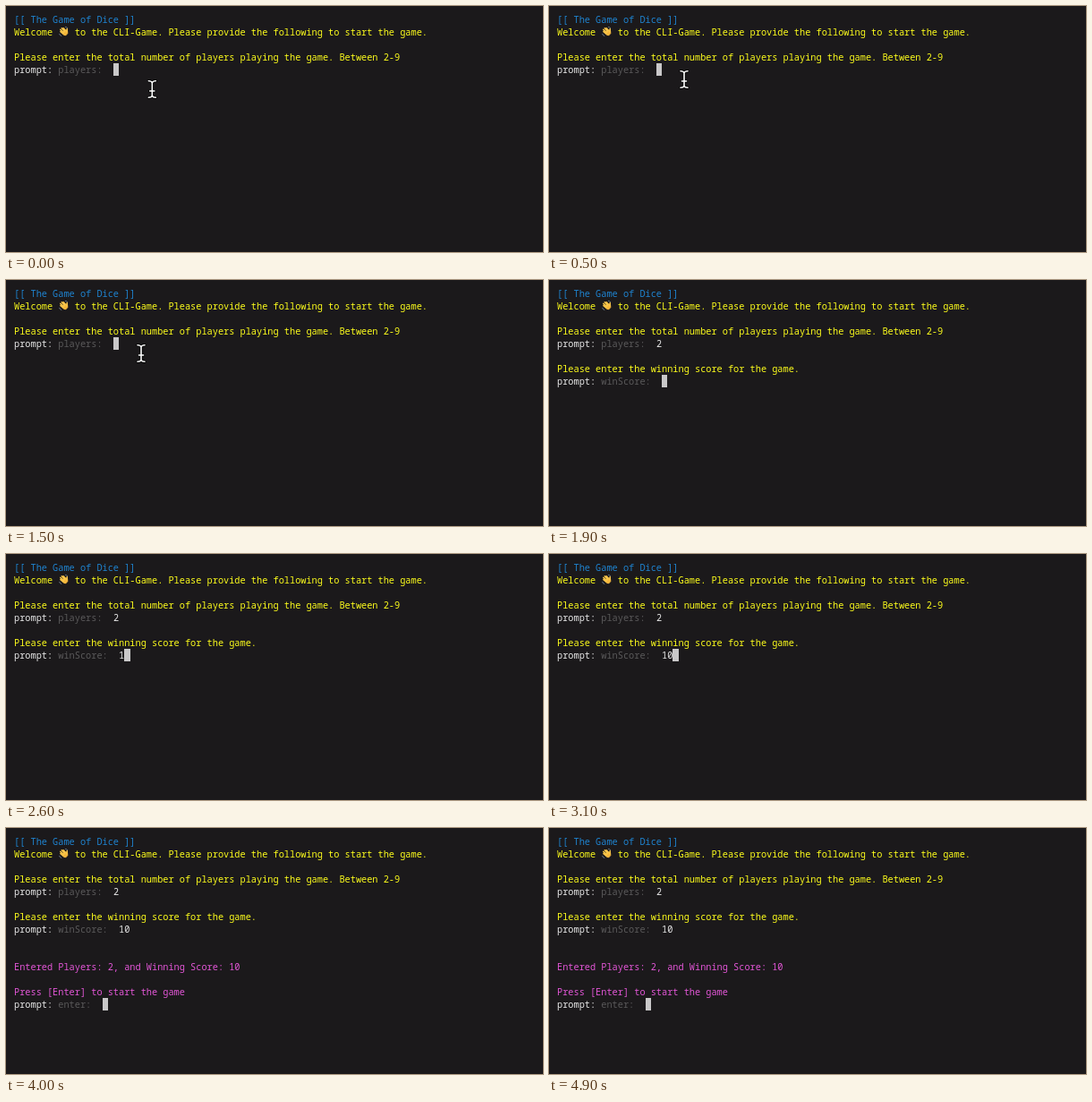
These frames come from a looping animation (600 px wide and 275 px high, 5 s). An HTML page:

```html
<!DOCTYPE html>
<html lang="en">
<meta charset="utf-8">
<title>The Game of Dice</title>
<style>
  html, body { margin: 0; width: 100%; height: 100%; overflow: hidden; background: #1b191b; }
  #term {
    position: absolute; left: 9px; top: 8px; margin: 0;
    font: 10.27px/14px "Noto Sans Mono", "DejaVu Sans Mono", monospace;
    font-variant-ligatures: none; color: #e8e8e8;
  }
  .title { color: #1f83cf; }
  .ask { color: #fdfd1c; }
  .dim { color: #5a595a; }
  .done { color: #e256d6; }
  .block { display: inline-block; width: 6.4px; height: 14px; background: #c9c8c9; vertical-align: top; }
  svg { position: absolute; left: 0; top: 0; }
</style>
<pre id="term"></pre>
<svg width="600" height="275" fill="none" stroke-linecap="round" stroke-linejoin="round">
  <g id="hand" transform="translate(58.5 22.5)">
    <path d="M4.5 6.5 7 4.7 10 4.6 10.3 8 8.5 10.2 6.5 10Z" fill="#f6b73c" stroke="#f6b73c"/>
    <path d="M5.5 8.7 2.4 6.1M6 7.2 2.3 3.9M7 6 3.8 2.3M8 5 5.7 2.2M9.8 6.5 9.7 3.1" stroke="#fac64a" stroke-width="1.5"/>
    <path d="M1.1 8.8Q1.6 10.5 3.3 11M8 .9Q9.4 1 10.2 2" stroke="#7b8ea0" stroke-width=".8"/>
  </g>
  <g id="mouse">
    <path id="beam" d="M-4-9.3Q-.8-9.3 0-7.3Q.8-9.3 4-9.3M0-7.3V7.3M-4 9.3Q-.8 9.3 0 7.3Q.8 9.3 4 9.3M-2.6 2H2.6"
      stroke="#000" stroke-width="3.2"/>
    <use href="#beam" style="stroke:#fff"/>
    <path d="M-4-9.3Q-.8-9.3 0-7.3Q.8-9.3 4-9.3M0-7.3V7.3M-4 9.3Q-.8 9.3 0 7.3Q.8 9.3 4 9.3M-2.6 2H2.6"
      stroke="#fff" stroke-width="1.6"/>
  </g>
</svg>
<script>
  const LOOP = 5000, STEP = 100;
  const KEY_2 = 1700, ENTER_1 = 1900, KEY_1 = 2600, KEY_0 = 2800, ENTER_2 = 3400;
  const term = document.getElementById('term');
  const mouse = document.getElementById('mouse');
  document.querySelector('use').remove();

  const span = (cls, text) => `<span class="${cls}">${text}</span>`;
  const prompt = (label, typed, active) =>
    `prompt: ${span('dim', label + ':')}  ${typed}${active ? span('block', '') : ''}`;

  function screen(t) {
    const lines = [
      span('title', '[[ The Game of Dice ]]'),
      span('ask', 'Welcome    to the CLI-Game. Please provide the following to start the game.'),
      '',
      span('ask', 'Please enter the total number of players playing the game. Between 2-9'),
      prompt('players', t >= KEY_2 ? '2' : '', t < ENTER_1)
    ];
    if (t >= ENTER_1) lines.push(
      '',
      span('ask', 'Please enter the winning score for the game.'),
      prompt('winScore', t >= KEY_0 ? '10' : t >= KEY_1 ? '1' : '', t < ENTER_2)
    );
    if (t >= ENTER_2) lines.push(
      '', '',
      span('done', 'Entered Players: 2, and Winning Score: 10'),
      '',
      span('done', 'Press [Enter] to start the game'),
      prompt('enter', '', true)
    );
    return lines.join('\n');
  }

  let shown = -1;
  function frame() {
    const t = Math.floor(performance.now() % LOOP / STEP) * STEP;
    if (t !== shown) {
      shown = t;
      term.innerHTML = screen(t);
      const p = Math.min(t / 400, 1), ease = p * p * (3 - 2 * p);
      mouse.setAttribute('transform', `translate(${163.3 - 12.3 * ease} ${93 - 11 * ease})`);
      mouse.style.display = t < KEY_2 ? '' : 'none';
    }
    requestAnimationFrame(frame);
  }
  frame();
</script>
</html>
```
